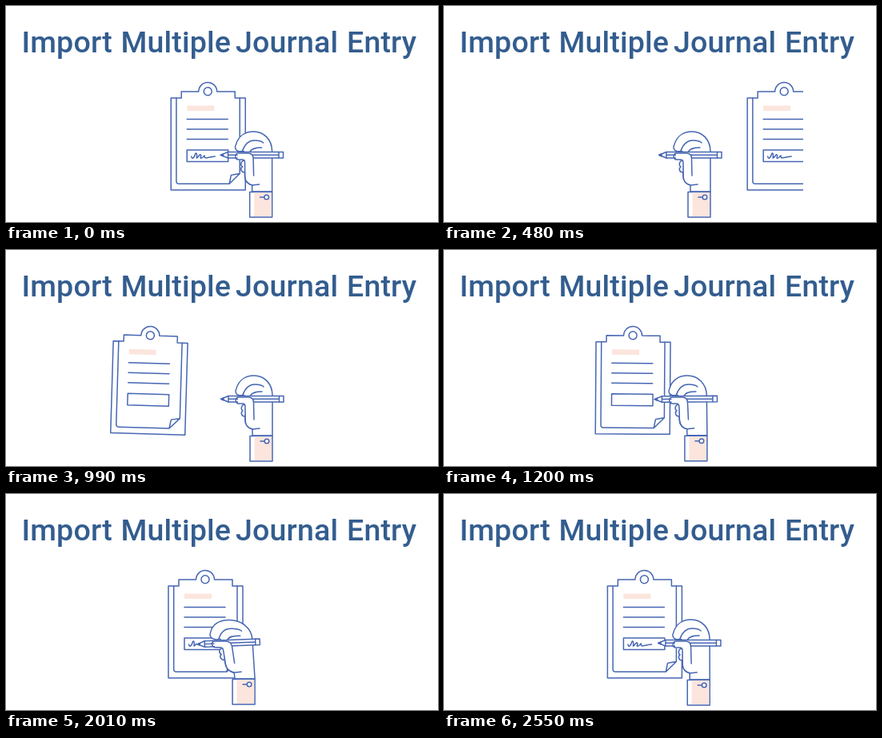
These frames come from a looping animation (540 by 270 pixels, 2.58 s). An HTML page:

```html
<!DOCTYPE html>
<html lang="en">
<head>
<meta charset="utf-8">
<style>
  html, body { margin: 0; width: 100%; height: 100%; overflow: hidden; background: #fff; }
  svg { display: block; width: 540px; height: 270px; }
  text { font: 500 37.6px Roboto, sans-serif; letter-spacing: .15px; fill: #335d8f; }
  .ink { fill: #fff; stroke: #4767b3; stroke-width: 1.5; stroke-linejoin: round; stroke-linecap: round; }
  .line { fill: none; }
  .pink { fill: #fce5dd; stroke: none; }
</style>
</head>
<body>
<svg viewBox="0 0 540 270">
  <clipPath id="view"><rect x="91" y="80" width="358" height="190"/></clipPath>
  <clipPath id="written"><rect id="ink" x="226" y="180" height="15"/></clipPath>
  <text y="58"><tspan x="19.500">Import</tspan> <tspan x="143.500">Multiple</tspan> <tspan x="287">Journal</tspan> <tspan x="426">Entry</tspan></text>
  <g class="ink" clip-path="url(#view)">
    <g id="board">
      <path d="M206 115H219V107H240.500A11.500 11.500 0 0 1 263.500 107H286V115H299V230H206Z"/>
      <circle cx="252" cy="106.800" r="5"/>
      <path class="line" d="M212.700 115V219Q212.700 222.300 216 222.300H279L292 209.500V115M279 222L281 212Q281 211 283 211L292 209.500"/>
      <path class="pink" d="M226 124.500H260V131H226Z"/>
      <path class="line" d="M226 141.500H277M226 154H277M226 166.500H277M226 180H277.500V194.500H226Z"/>
      <path class="line" clip-path="url(#written)" d="M231.500 188C232 192 235 190 236 186C237 182 239 184 238 190C241 189 241 185 243 186C245 187 241 191 244 190C247 190 246 187 248 187C247 192 251 189 261 188"/>
    </g>
    <g id="hand">
      <path d="M308,232 L308,224 C303,223 299,219 299,213 L298,182 L296,181 C295,182 293,182 291,181.5 C287,180 286,177 288,173 C291,163 299,157 310,157 C323,157 333,167 333,182 L333,232 Z"/>
      <path class="line" d="M296,181 C299,173 304,168 311,168 C316,168 320,169 322,171 M305,183 C307,178 312,177 320,177"/>
      <path d="M299,193 C294,193 293,199 296,201 C293,203 294,208 299,208"/>
    </g>
    <g id="pen">
      <path d="M268.700 186.300L278 182.500H347V190H278Z"/>
      <path class="line" d="M278 182.500V190M278 186.300H341.500M341.500 182.500V190"/>
      <path d="M268.700 186.300L272 185V187.700Z" fill="#4767b3"/>
    </g>
    <g id="thumb">
      <path stroke="none" d="M290,184 L303,184 C308,184 310,187 310,192 L310,223 L301,219 L299,193 L290,193 Z"/>
      <path class="line" d="M310,212 L309.5,191 C309.5,186 307,184 303,184 L291,184 C286,184 286,192 291,192 L296,192 C299,192 299,194 299,198 L299,213 C299,219 303,223 308,224 L317,223"/>
    </g>
    <g id="cuff">
      <path d="M305 232.500H333V264H305Z"/>
      <path class="pink" d="M310.500 233.500H332V263H310.500Z"/>
      <path class="line" d="M318 239H323"/>
      <circle cx="326" cy="239" r="2.800"/>
    </g>
  </g>
</svg>
<script>
const LOOP = 2580;
const el = id => document.getElementById(id);
const board = el('board'), pen = el('pen'), cuff = el('cuff'), ink = el('ink');
const skin = [...document.querySelectorAll('#hand path, #thumb path')]
  .map(node => ({ node, d: node.getAttribute('d') }));

const ease = (t, from, to) => {
  const u = Math.min(1, Math.max(0, (t - from) / (to - from)));
  return u * u * (3 - 2 * u);
};

// Bends a hand point: the wrist follows the cuff, the fingers reach further.
const bend = (x, y, reach) => {
  const up = (232 - y) / 48;
  const dx = -28 - up * (4 + (332 - x) / 45 * 7);
  return `${(x + reach * dx).toFixed(2)},${(y - 1.3 * reach * (1 - up)).toFixed(2)}`;
};

function boardPose(t) {
  const out = t < 700 ? t : t - LOOP;
  if (out > -95) return [175.5 * ((out + 95) / 575) ** 2.23, 0];
  const left = Math.max(0, 1400 - t) / 410;
  return [-69 * left ** 2.32, 1.7 * left ** 2];
}

function draw(t) {
  const [offset, tilt] = boardPose(t);
  board.setAttribute('transform', `translate(${offset - 3} 0) rotate(${tilt} 252 106.5)`);

  const reach = t < 700 ? 1 - ease(t + LOOP, 1740, 2640)
    : ease(t, 1100, 1520) - ease(t, 1740, 2640);
  for (const { node, d } of skin) {
    node.setAttribute('d', d.replace(/([\d.]+),([\d.]+)/g, (_, x, y) => bend(+x, +y, reach)));
  }
  pen.setAttribute('transform', `translate(${-38 * reach} 0) rotate(${-3 * reach} 307.5 186.3)`);
  cuff.setAttribute('transform', `translate(${-28 * reach} ${-1.3 * reach})`);

  const written = t < 700 ? 40 : t > 1700 ? 45 - 38 * reach : 0;
  ink.setAttribute('width', Math.max(0, written));
}

function tick() {
  draw(performance.now() % LOOP);
  requestAnimationFrame(tick);
}
tick();
</script>
</body>
</html>
```
